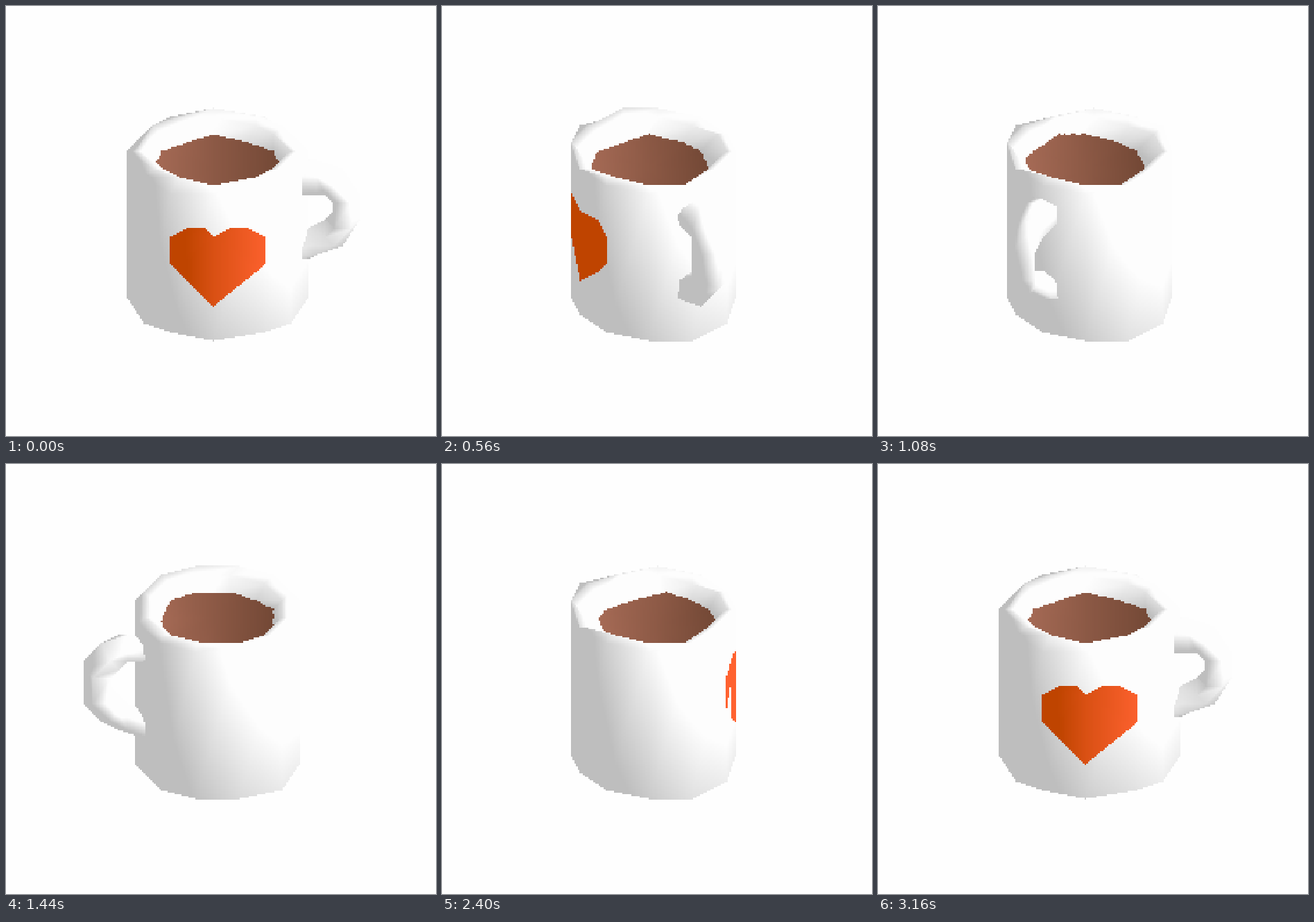
Write an HTML page with a canvas that moves like this. It is 620x620 px and loops after 3200 ms.

```html
<!DOCTYPE html>
<html lang="en">
<head>
<meta charset="utf-8">
<title>Spinning mug</title>
<style>
  html, body { margin: 0; width: 100%; height: 100%; overflow: hidden; background: #fefefe; }
  canvas { display: block; width: 100vw; height: 100vh; image-rendering: pixelated; }
</style>
</head>
<body>
<canvas id="view" width="250" height="250"></canvas>
<script>
const SIZE = 250, SIDES = 12, STEPS = 80, STEP_MS = 40;
const ctx = document.getElementById('view').getContext('2d');
const image = ctx.createImageData(SIZE, SIZE);
const pixels = new Uint32Array(image.data.buffer);
const depth = new Float32Array(SIZE * SIZE);
const BACKDROP = 0xfffefefe;
const RADIUS = 10.001;

// Each material runs from its shaded colour to its lit colour.
const CHINA = [[190, 190, 190], [253, 253, 253]];
const COFFEE = [[106, 66, 48], [168, 108, 87]];
const HEART = [[191, 68, 0], [255, 98, 48]];

const rad = deg => deg * Math.PI / 180;
const faces = [];

// x right, h up (already foreshortened), z towards the viewer
const vertex = (x, h, z, nx, nh, nz) => ({ x, h, z, nx, nh, nz });

function turned(r, h, angle, nr, nh, shift = 0) {
  const s = Math.sin(angle), c = Math.cos(angle);
  return vertex(r * s, h, r * c + shift, nr * s, nh, nr * c);
}

function addFace(points, skin, extra) {
  faces.push({ points, skin, ...extra });
}

function addStrip(a, b, skin) {
  a.forEach((p, i) => {
    const j = (i + 1) % a.length;
    addFace([p, a[j], b[j]], skin);
    addFace([p, b[j], b[i]], skin);
  });
}

function buildCup() {
  // The surface of the drink sits slightly towards the heart.
  const level = [7.01, 6.83], shift = 0.6;
  // radius, height, outward and upward part of the normal, shift
  const profile = [
    [RADIUS, -8.55, 0.65, 0],
    [RADIUS, 8.3, 1, 0.6],
    [9.05, 8.95, 0.45, 0.95],
    [8.05, 8.5, -0.4, 0.9],
    [...level, -0.8, 0.7, shift]
  ];
  const ring = ([r, h, nr, nh, dz]) => Array.from({ length: SIDES },
    (_, i) => turned(r, h, i * 2 * Math.PI / SIDES, nr, nh, dz));
  const rings = profile.map(ring);
  for (let i = 1; i < rings.length; i++) addStrip(rings[i - 1], rings[i], CHINA);

  const pool = ring([...level, -0.42, 0.55, shift]);
  const middle = vertex(0, level[1], shift, 0, 0.55, 0);
  pool.forEach((p, i) => addFace([middle, p, pool[(i + 1) % SIDES]], COFFEE));
}

function buildHandle() {
  const path = [[8.5, 5.4], [11.2, 5.6], [13.3, 5], [14.65, 3.45],
    [14.65, 0.5], [13.3, -1.05], [11.3, -2.3], [8.5, -3.4]];
  const rings = path.map((p, i) => {
    const a = path[Math.max(i - 1, 0)], b = path[Math.min(i + 1, path.length - 1)];
    const dx = b[0] - a[0], dh = b[1] - a[1], len = Math.hypot(dx, dh);
    const ox = -dh / len, oh = dx / len;
    return Array.from({ length: 6 }, (_, k) => {
      const c = Math.cos(rad(60 * k)), s = Math.sin(rad(60 * k));
      return vertex(p[0] + 1.5 * c * ox, p[1] + 1.5 * c * oh, 1.99 * s,
        c * ox, c * oh + 0.15, s);
    });
  });
  for (let i = 1; i < rings.length; i++) addStrip(rings[i - 1], rings[i], CHINA);
}

function buildHeart() {
  // degrees from the middle line, height
  const outline = [[0, 3.4], [8, 4.5], [19, 4.1], [30, 2.8], [30, 0.1], [26, -1.4], [0, -4.6]];
  const flat = RADIUS * Math.cos(rad(15));
  for (const side of [-1, 1]) {
    const half = outline.map(([deg, h]) =>
      turned(flat / Math.cos(rad(deg - 15)), h, rad(side * deg), 1, 0.05));
    const lean = rad(15 * side);
    for (let i = 1; i < half.length - 1; i++) {
      addFace([half[0], half[i], half[i + 1]], HEART, { lean, lift: 0.6 });
    }
  }
}

// Turn, project at 30 degrees and snap to a coarse five-pixel grid.
function project(p, turn) {
  const c = Math.cos(turn), s = Math.sin(turn);
  const x = p.x * c - p.z * s, z = p.x * s + p.z * c;
  const nx = p.nx * c - p.nz * s, nz = p.nx * s + p.nz * c;
  return {
    x: 125.5 + 5 * Math.floor(x - 1e-6),
    y: 124.5 - 5 * Math.floor(p.h - z * 0.5),
    d: z * 0.866 + p.h * 0.577,
    light: [1.15 * nx + 0.35 * nz + p.nh, p.nh + nx]
  };
}

function fill(a, b, c, skin, lift = 0) {
  const area = (b.x - a.x) * (c.y - a.y) - (b.y - a.y) * (c.x - a.x);
  if (!area) return;
  const [lo, hi] = skin, mode = skin === COFFEE ? 1 : 0;
  const x0 = Math.floor(Math.min(a.x, b.x, c.x)), x1 = Math.ceil(Math.max(a.x, b.x, c.x));
  const y0 = Math.floor(Math.min(a.y, b.y, c.y)), y1 = Math.ceil(Math.max(a.y, b.y, c.y));
  for (let y = y0; y < y1; y++) {
    for (let x = x0; x < x1; x++) {
      const px = x + 0.5, py = y + 0.5;
      const u = ((b.x - px) * (c.y - py) - (b.y - py) * (c.x - px)) / area;
      const v = ((c.x - px) * (a.y - py) - (c.y - py) * (a.x - px)) / area;
      const w = 1 - u - v;
      if (u < -1e-9 || v < -1e-9 || w < -1e-9) continue;
      const d = u * a.d + v * b.d + w * c.d + lift, at = y * SIZE + x;
      if (d <= depth[at]) continue;
      depth[at] = d;
      const raw = u * a.light[mode] + v * b.light[mode] + w * c.light[mode];
      const k = Math.min(1, Math.max(0, raw));
      const tone = i => Math.round(lo[i] + (hi[i] - lo[i]) * k);
      pixels[at] = (255 << 24 | tone(2) << 16 | tone(1) << 8 | tone(0)) >>> 0;
    }
  }
}

// The first and last steps of a loop share the same pose.
function draw(step) {
  const turn = step / (STEPS - 1) * 2 * Math.PI;
  pixels.fill(BACKDROP);
  depth.fill(-1e9);
  for (const { points, skin, lean, lift } of faces) {
    if (lean !== undefined && Math.cos(lean - turn) <= 0) continue;
    const [a, b, c] = points.map(p => project(p, turn));
    fill(a, b, c, skin, lift);
  }
  ctx.putImageData(image, 0, 0);
}

buildCup();
buildHandle();
buildHeart();

const start = performance.now();
let shown = -1;
function tick() {
  const step = Math.floor((performance.now() - start) / STEP_MS) % STEPS;
  if (step !== shown) draw(shown = step);
  requestAnimationFrame(tick);
}
tick();
</script>
</body>
</html>
```
